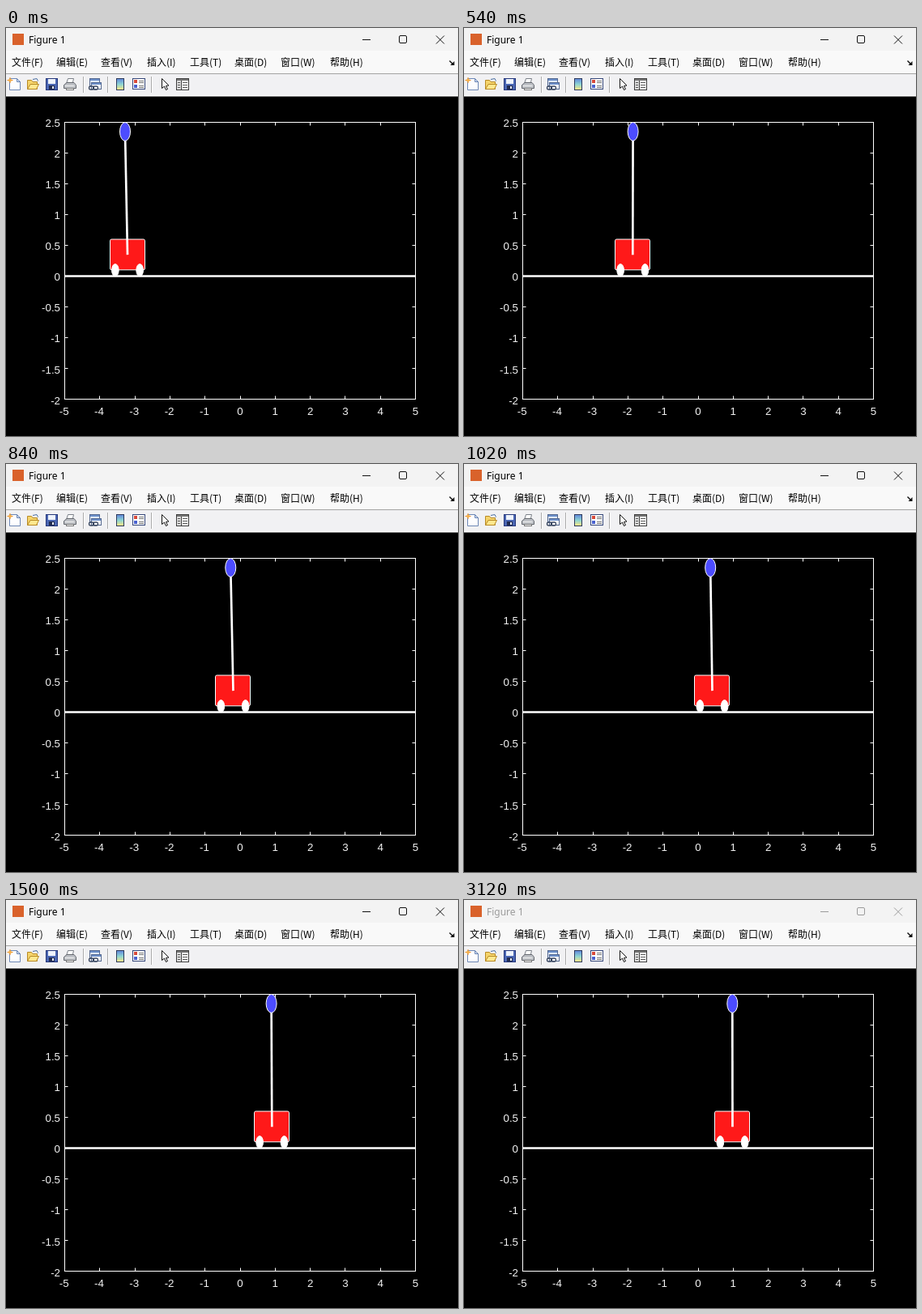
An HTML page with a canvas for the animation above (3180 ms loop, 558 by 504 pixels).

```html
<!DOCTYPE html>
<html lang="zh">
<head>
<meta charset="utf-8">
<title>Figure 1</title>
<style>
html, body { margin: 0; width: 558px; height: 504px; overflow: hidden; background: #000; }
canvas, svg { position: absolute; left: 0; top: 0; display: block; }
.ui { font: 12px "Noto Sans", "Open Sans", sans-serif; fill: #000; }
.menu { font: 12px "Noto Sans CJK SC", "Noto Sans CJK", sans-serif; fill: #000; }
.tick { font: 13.33px "Liberation Sans", Arial, sans-serif; fill: #f2f2f2; }
</style>
</head>
<body>
<canvas id="stage" width="558" height="504"></canvas>
<svg id="labels" width="558" height="504"></svg>
<script>
const ctx = document.getElementById('stage').getContext('2d');
const labels = document.getElementById('labels');
const STEP = 60, LOOP = 3180, BLUR_AT = 3120, LAST = 32;
const AX = { left: 72.5, right: 505.5, top: 116.5, bottom: 459 };
const ux = (AX.right - AX.left) / 10, uy = (AX.bottom - AX.top) / 4.5;
const px = x => AX.left + (x + 5) * ux;
const py = y => AX.top + (2.5 - y) * uy;

// Knots: [step, pixels]
const cartPath = [[0, 150], [1, 143], [3, 138], [5, 146.5], [9, 208.3], [12, 254.7], [14, 280.5],
  [17, 306.5], [18, 309.7], [21, 320.8], [25, 328.3], [27, 329.4], [32, 331.5]];
const leanPath = [[0, -3], [1, 0.5], [2, 4], [3, 6.2], [4, 7], [5, 6.6], [9, 0.3], [12, -3],
  [14, -3.2], [17, -2.3], [25, -0.7], [32, -0.2]];

// Monotone cubic through the knots
function curve(pts, t) {
  const n = pts.length - 1;
  const grad = i => (pts[i + 1][1] - pts[i][1]) / (pts[i + 1][0] - pts[i][0]);
  const tangent = i => {
    if (i === 0) return grad(0);
    if (i === n) return grad(n - 1);
    const a = grad(i - 1), b = grad(i);
    return a * b <= 0 ? 0 : 2 * a * b / (a + b);
  };
  let i = 0;
  while (i < n - 1 && t > pts[i + 1][0]) i++;
  const h = pts[i + 1][0] - pts[i][0], s = (t - pts[i][0]) / h;
  const s2 = s * s, s3 = s2 * s;
  return (2 * s3 - 3 * s2 + 1) * pts[i][1] + (s3 - 2 * s2 + s) * h * tangent(i)
    + (3 * s2 - 2 * s3) * pts[i + 1][1] + (s3 - s2) * h * tangent(i + 1);
}

function text(str, x, y, cls, anchor = 'start') {
  const el = document.createElementNS('http://www.w3.org/2000/svg', 'text');
  el.setAttribute('x', x);
  el.setAttribute('y', y);
  el.setAttribute('class', cls);
  el.setAttribute('text-anchor', anchor);
  el.textContent = str;
  labels.appendChild(el);
  return el;
}

function rect(x, y, w, h, color) {
  ctx.fillStyle = color;
  ctx.fillRect(x, y, w, h);
}

function frame(x, y, w, h, fill, stroke) {
  rect(x, y, w, h, stroke);
  rect(x + 1, y + 1, w - 2, h - 2, fill);
}

function line(x1, y1, x2, y2, color, width = 1) {
  ctx.strokeStyle = color;
  ctx.lineWidth = width;
  ctx.beginPath();
  ctx.moveTo(x1, y1);
  ctx.lineTo(x2, y2);
  ctx.stroke();
}

function poly(pts, fill, stroke) {
  ctx.beginPath();
  pts.forEach(([x, y]) => ctx.lineTo(x, y));
  ctx.closePath();
  ctx.fillStyle = fill;
  ctx.fill();
  if (stroke) {
    ctx.strokeStyle = stroke;
    ctx.lineWidth = 1;
    ctx.stroke();
  }
}

function oval(x, y, rx, ry, fill, stroke) {
  ctx.beginPath();
  ctx.ellipse(x, y, rx, ry, 0, 0, Math.PI * 2);
  ctx.fillStyle = fill;
  ctx.fill();
  if (stroke) {
    ctx.strokeStyle = stroke;
    ctx.lineWidth = 1;
    ctx.stroke();
  }
}

function titleBar(active) {
  const ink = active ? '#111' : '#9b9b9b';
  rect(0, 0, 558, 28, '#f3f3f3');
  rect(8, 7, 14, 14, '#d9622b');
  line(440, 14.5, 450, 14.5, ink);
  ctx.beginPath();
  ctx.roundRect(485.5, 9.5, 9, 9, 1.5);
  ctx.stroke();
  line(531, 9.5, 541, 19.5, ink);
  line(541, 9.5, 531, 19.5, ink);
  title.style.fill = active ? '#000' : '#9b9b9b';
}

function newIcon() {
  poly([[4.5, 62.5], [13.5, 62.5], [17.5, 66.5], [17.5, 76.5], [4.5, 76.5]], '#fdfdff', '#6d87b5');
  poly([[13.5, 62.5], [13.5, 66.5], [17.5, 66.5]], '#cfdcf2', '#6d87b5');
  line(1.5, 64.5, 8.5, 64.5, '#e88b25');
  line(5, 61, 5, 68, '#e88b25');
  oval(5, 64.5, 2, 2, '#f6b04a');
}

function openIcon() {
  poly([[26.5, 75.5], [26.5, 64.5], [31.5, 64.5], [33, 66.5], [38.5, 66.5], [38.5, 75.5]], '#f5d46c', '#b88a24');
  poly([[26.5, 75.5], [30, 69.5], [40.5, 69.5], [37.5, 75.5]], '#ffe88f', '#b88a24');
  line(33, 63.5, 38, 62.5, '#4a6fa5');
  line(38, 62.5, 39.5, 65.5, '#4a6fa5');
}

function saveIcon() {
  frame(49, 62, 15, 15, '#4b67b4', '#26377a');
  rect(52, 63, 9, 6, '#eef3fc');
  rect(53, 71, 7, 5, '#222c50');
  rect(57, 72, 2, 3, '#e5e9f4');
}

function printIcon() {
  poly([[76.5, 62.5], [83.5, 62.5], [82, 69], [74.5, 69]], '#fff', '#7b8088');
  poly([[71.5, 70.5], [75, 67.5], [84, 67.5], [86.5, 70.5], [86.5, 74.5], [71.5, 74.5]], '#bfc2c7', '#62666d');
  rect(73, 71, 11, 1, '#eee');
  frame(74, 74, 10, 3, '#fff', '#777');
}

function linkIcon() {
  frame(103, 62, 13, 10, '#dfe9f8', '#54688f');
  rect(104, 63, 11, 2, '#6d90ca');
  frame(105, 67, 13, 9, '#fff', '#54688f');
  rect(106, 68, 11, 2, '#6d90ca');
  ctx.strokeStyle = '#384660';
  ctx.lineWidth = 1.3;
  for (const x of [102.5, 107.5]) {
    ctx.beginPath();
    ctx.roundRect(x, 72, 6, 4, 2);
    ctx.stroke();
  }
}

function colorbarIcon() {
  frame(136, 62, 10, 15, '#fff', '#2d3a5c');
  const g = ctx.createLinearGradient(0, 63, 0, 76);
  g.addColorStop(0, '#648bdb');
  g.addColorStop(0.5, '#8cd4d3');
  g.addColorStop(1, '#f5e887');
  rect(137, 63, 8, 13, g);
}

function legendIcon() {
  frame(156, 62, 16, 14, '#fff', '#37487a');
  rect(158, 64, 4, 4, '#d84a3a');
  rect(158, 70, 4, 4, '#4a62cf');
  for (const y of [65, 67, 71, 73]) rect(164, y, 6, 1, '#777');
}

function cursorIcon() {
  poly([[192.5, 62.5], [192.5, 74.5], [195.5, 72], [197.5, 76.5], [199.5, 75.5], [197.5, 71.5], [201, 71]], '#fff', '#111');
}

function panelIcon() {
  frame(210, 62, 16, 15, '#fff', '#3d3d3d');
  rect(211, 63, 14, 2, '#777');
  rect(216, 65, 1, 11, '#3d3d3d');
  rect(211, 65, 5, 11, '#dedede');
  for (const y of [67, 70, 73]) {
    rect(212, y, 3, 1, '#555');
    rect(218, y, 6, 1, '#555');
  }
}

function bars() {
  rect(0, 28, 558, 28, '#f9f9f9');
  rect(0, 56, 558, 1, '#a3a3a3');
  rect(0, 57, 558, 27, '#f1f1f3');
  rect(0, 83, 558, 1, '#fff');
  rect(0, 84, 558, 1, '#8b8b8b');
  line(547.5, 40.5, 552, 45, '#111', 1.4);
  poly([[553.5, 41], [553.5, 46], [548.5, 46]], '#111');
  for (const x of [95, 125, 179]) {
    rect(x, 60, 1, 20, '#aaa');
    rect(x + 1, 60, 1, 20, '#fff');
  }
  newIcon();
  openIcon();
  saveIcon();
  printIcon();
  linkIcon();
  colorbarIcon();
  legendIcon();
  cursorIcon();
  panelIcon();
}

function axes() {
  const ink = '#fff', b = 458.5;
  ctx.strokeStyle = ink;
  ctx.lineWidth = 1;
  ctx.strokeRect(AX.left, AX.top, AX.right - AX.left, b - AX.top);
  for (let x = -4; x < 5; x++) {
    const X = Math.floor(px(x)) + 0.5;
    line(X, AX.top, X, AX.top + 4, ink);
    line(X, b, X, b - 4, ink);
  }
  for (let y = -1.5; y < 2.5; y += 0.5) {
    const Y = Math.floor(py(y)) + 0.5;
    line(AX.left, Y, AX.left + 4, Y, ink);
    line(AX.right, Y, AX.right - 4, Y, ink);
  }
}

function pendulum(x, lean) {
  const white = '#fff', left = Math.round(x - ux / 2 - 0.5) + 0.5;
  const tilt = lean / ux, bobY = py(0.35 + Math.sqrt(4 - tilt * tilt));
  line(AX.left, 306.5, AX.right, 306.5, white, 2.67);
  ctx.beginPath();
  ctx.roundRect(left, 261, 43, 37.8, 1.8);
  ctx.fillStyle = '#ff1919';
  ctx.fill();
  ctx.strokeStyle = white;
  ctx.lineWidth = 1;
  ctx.stroke();
  for (const side of [-1, 1]) oval(x + side * 0.35 * ux, py(0.1), 0.1 * ux, 0.1 * uy, white, white);
  line(x, py(0.35), x + lean, bobY, white, 2.67);
  oval(x + lean, bobY, 0.15 * ux, 0.15 * uy, '#4c4cff', white);
}

const title = text('Figure 1', 28, 19, 'ui');
[['文件(F)', 7], ['编辑(E)', 62], ['查看(V)', 117], ['插入(I)', 174], ['工具(T)', 227],
  ['桌面(D)', 282], ['窗口(W)', 339], ['帮助(H)', 400]].forEach(([s, x]) => text(s, x, 47, 'menu'));
for (let x = -5; x <= 5; x++) text(x, px(x) - (x < 0 ? 0.8 : 0), 478, 'tick', 'middle');
for (let y = -2; y <= 2.5; y += 0.5) text(y, 67, py(y) + 5.6, 'tick', 'end');

const start = performance.now();
function draw() {
  const t = (performance.now() - start) % LOOP;
  const step = Math.min(Math.floor(t / STEP), LAST);
  rect(0, 0, 558, 504, '#000');
  titleBar(t < BLUR_AT);
  bars();
  axes();
  pendulum(curve(cartPath, step), curve(leanPath, step));
  requestAnimationFrame(draw);
}
draw();
</script>
</body>
</html>
```
